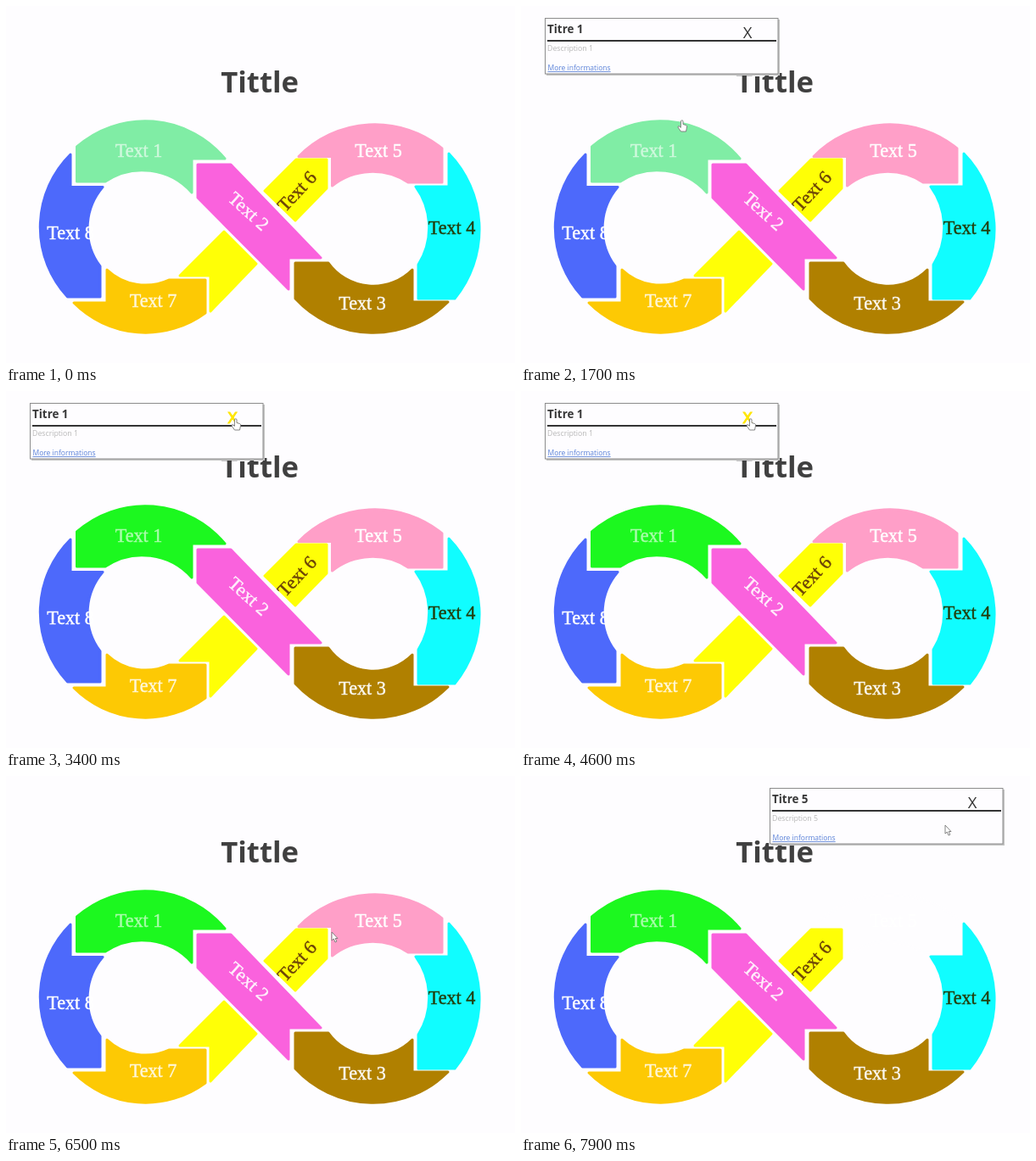
Write an HTML page that moves like this. It is 600 px wide and 421 px high and loops after 8 s.

```html
<!DOCTYPE html>
<html lang="en">
<head>
<meta charset="utf-8">
<title>Infinity diagram</title>
<style>
  html, body { margin: 0; width: 100%; height: 100%; overflow: hidden; background: #fefdff; }
  svg { display: block; width: 600px; height: 421px; }
  .segments path { stroke-width: 3; stroke-linejoin: round; }
  .labels text { font: 22.2px "Liberation Serif", serif; text-anchor: middle; stroke-width: .45; }
  .title { font: bold 34.7px "Open Sans", sans-serif; fill: #404040; }
  .popup { font-family: "Open Sans", sans-serif; }
  .heading { font-weight: bold; font-size: 13.4px; fill: #383838; }
  .note { font-size: 8.75px; fill: #b8b8b8; }
  .link { font-size: 8.5px; fill: #5b82d8; text-decoration: underline; }
  .close { font-size: 18.5px; text-anchor: middle; stroke-width: 1.2; }
  .cursor { fill: #fff; stroke: #777; stroke-width: .9; stroke-linejoin: round; }
</style>
</head>
<body>
<svg viewBox="0 0 600 421">
  <rect width="600" height="421" fill="#fefdff"/>
  <text class="title" x="253.2" y="102">Tittle</text>
  <g class="segments"></g>
  <g class="labels"></g>
  <g class="popup">
    <rect x="30" y="16" width="275" height="66" fill="#c4c4c4"/>
    <rect x="28.5" y="14.5" width="274.5" height="65.5" fill="#fefdff" stroke="#8c8c8c"/>
    <text class="heading" x="31" y="32"></text>
    <path d="M31 41H301" stroke="#333" stroke-width="2"/>
    <text class="note" x="31" y="53"></text>
    <text class="link" x="31.5" y="76">More informations</text>
    <text class="close" x="267" y="37.5">X</text>
  </g>
  <g class="cursor">
    <path class="hand" d="M-1.5 -5.5Q0 -7 1 -5.5V-1.5L4.5 -.5Q6 0 5.5 2L4.5 7H-1.5L-5 2Q-5 0 -3.2 1L-1.7 2.4Z"/>
    <path class="arrow" d="M0 0V10L2.3 8L4 12L5.8 11.2L4.2 7.5H7Z"/>
  </g>
</svg>
<script>
const LOOP = 8000;
const LIGHT_GREEN = '#80eda5', GREEN = '#1cf81f', PINK = '#ff9fc8', BLANK = '#fefdff', YELLOW = '#ffff06';

const segments = [
  [LIGHT_GREEN, 'M83.5 166A122 122 0 0 1 258 180H219V220A78 78 0 0 0 117 207H83.5Z'],
  ['#fa62dd', 'M226 187H265L371 297H333V334L226 226Z'],
  ['#b08000', 'M341 303H380A65 65 0 0 0 479 311V349H521A125 125 0 0 1 341 345Z'],
  ['#10fdff', 'M522 174A129 129 0 0 1 529 345H486V305A82 82 0 0 0 483 213H522Z'],
  [PINK, 'M345 177.5A125.5 125.5 0 0 1 514 168V208H474A76 76 0 0 0 384.5 212V177.5Z'],
  [YELLOW, 'M342 181H378V215L341 253L305 218ZM257 266L295 304L241 360V318H205Z'],
  ['#fdc904', 'M80 350H119V311A66 66 0 0 0 192 323H235V362A119 119 0 0 1 80 350Z'],
  ['#4d69fb', 'M76 175A121 121 0 0 0 72.5 343H111V307A75 75 0 0 1 114 213.5H76Z']
];

// centre x, centre y, rotation, fill, opacity
const labels = [
  [156.5, 169.5, 0, '#fff', .62], [286.5, 241.5, 42, '#fff', .9],
  [420, 350, 0, '#fff', .95], [525.5, 261, 0, '#22400f', 1],
  [439, 170, 0, '#fff', 1], [342.5, 218, -47, '#6b4208', 1],
  [173.5, 347, 0, '#fff', .85], [76, 267, 0, '#fff', 1]
];

const $ = selector => document.querySelector(selector);
$('.segments').innerHTML = segments
  .map(([fill, d]) => `<path d="${d}" fill="${fill}" stroke="${fill}"/>`).join('');
$('.labels').innerHTML = labels.map(([x, y, turn, fill, opacity], i) =>
  `<text transform="translate(${x} ${y}) rotate(${turn})" y="8" fill="${fill}" stroke="${fill}" opacity="${opacity}">Text ${i + 1}</text>`
).join('');

const [first, , , , fifth] = $('.segments').children;
const popup = $('.popup'), heading = $('.heading'), note = $('.note'), closeMark = $('.close');
const cursor = $('.cursor'), hand = $('.hand'), arrow = $('.arrow');

// time, x, y
const track = [
  [1100, 200, 158], [1500, 190, 141], [2600, 190, 141], [3200, 271, 39],
  [4800, 271, 39], [5100, 273, 38], [6050, 273, 38], [6500, 384, 184],
  [6800, 440, 162], [7300, 440, 162], [7800, 500, 58], [8000, 500, 58]
];

function pointerAt(t) {
  const i = Math.max(1, track.findIndex(key => key[0] > t));
  const [t0, x0, y0] = track[i - 1], [t1, x1, y1] = track[i];
  const p = Math.max(0, (t - t0) / (t1 - t0));
  const ease = p * p * (3 - 2 * p);
  return [x0 + (x1 - x0) * ease, y0 + (y1 - y0) * ease];
}

const show = (node, visible) => node.setAttribute('visibility', visible ? 'visible' : 'hidden');
const between = (t, from, to) => t >= from && t < to;

function paint(node, color) {
  node.setAttribute('fill', color);
  node.setAttribute('stroke', color);
}

function render(t) {
  paint(first, t < 2700 ? LIGHT_GREEN : GREEN);
  paint(fifth, t < 7450 ? PINK : BLANK);

  const item = between(t, 1500, 5950) ? 1 : t >= 7000 ? 5 : 0;
  show(popup, item);
  popup.setAttribute('transform', `translate(${item === 5 ? 265 : 0})`);
  heading.textContent = `Titre ${item}`;
  note.textContent = `Description ${item}`;

  const onClose = between(t, 3100, 6100);
  closeMark.setAttribute('fill', onClose ? '#ffe600' : '#333');
  closeMark.setAttribute('stroke', onClose ? '#ffe600' : 'none');

  const visible = t >= 1100;
  const pointing = between(t, 1100, 2700) || onClose || between(t, 6600, 7450);
  show(hand, visible && pointing);
  show(arrow, visible && !pointing);
  cursor.setAttribute('transform', `translate(${pointerAt(t)})`);
}

const start = performance.now();
function tick() {
  render((performance.now() - start) % LOOP);
  requestAnimationFrame(tick);
}
tick();
</script>
</body>
</html>
```
